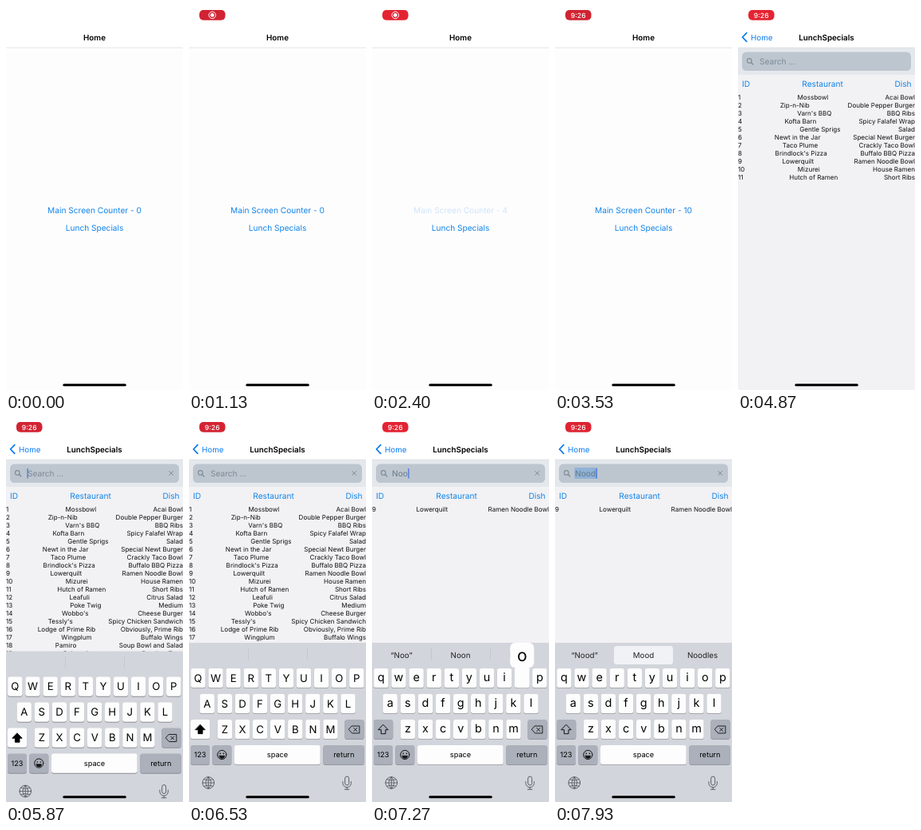
Recreate the animation shown at these times as an HTML page with a canvas. Size 222 by 480 pixels, loop 8000 ms.

```html
<!DOCTYPE html>
<html lang="en">
<head>
<meta charset="utf-8">
<title>Lunch specials app</title>
<style>
html, body { margin: 0; width: 100%; height: 100%; overflow: hidden; background: #fefdfe; }
canvas { display: block; width: 222px; height: 480px; }
</style>
</head>
<body>
<canvas id="stage"></canvas>
<script>
const W = 222, H = 480, LOOP = 8000;
const BLUE = '#1084e8', GREY = '#7d8a96';
const canvas = document.getElementById('stage');
const ctx = canvas.getContext('2d');
const dpr = window.devicePixelRatio || 1;
canvas.width = W * dpr;
canvas.height = H * dpr;

const ROWS = [
  ['Mossbowl', 'Acai Bowl'], ['Zip-n-Nib', 'Double Pepper Burger'],
  ["Varn's BBQ", 'BBQ Ribs'], ['Kofta Barn', 'Spicy Falafel Wrap'],
  ['Gentle Sprigs', 'Salad'], ['Newt in the Jar', 'Special Newt Burger'],
  ['Taco Plume', 'Crackly Taco Bowl'], ["Brindlock's Pizza", 'Buffalo BBQ Pizza'],
  ['Lowerquilt', 'Ramen Noodle Bowl'], ['Mizurei', 'House Ramen'],
  ['Hutch of Ramen', 'Short Ribs'], ['Leafuli', 'Citrus Salad'],
  ['Poke Twig', 'Medium'], ["Wobbo's", 'Cheese Burger'],
  ["Tessly's", 'Spicy Chicken Sandwich'], ['Lodge of Prime Rib', 'Obviously, Prime Rib'],
  ['Wingplum', 'Buffalo Wings'], ['Pamiro', 'Soup Bowl and Salad'],
  ["Galvero's", 'Carnitas Taco'], ['Tivra', 'Al Pastor Taco'],
  ["Nibbly Cheddar's", 'Nothing'], ['Toasted Elk', 'Ice Cream Sandwich']
].map(([name, dish], i) => ({ id: String(i + 1), name, dish }));

const TYPED = [['N', 6730], ['o', 7030], ['o', 7240], ['d', 7530]];
const HINTS = [
  ['', '', ''], ['“N”', 'No', 'Not'], ['“No”', 'Not', 'Now'],
  ['“Noo”', 'Noon', 'Nook'], ['“Nood”', 'Mood', 'Noodles']
];

const ramp = (t, from, length) => Math.min(1, Math.max(0, (t - from) / length));
const easeOut = p => 1 - (1 - p) ** 3;

function text(s, x, y, size, color, align = 'left', weight = 400) {
  ctx.font = `${weight} ${size}px Inter, sans-serif`;
  ctx.textAlign = align;
  ctx.fillStyle = color;
  ctx.fillText(s, x, y);
}

function box(x, y, w, h, r, color) {
  ctx.fillStyle = color;
  ctx.beginPath();
  ctx.roundRect(x, y, w, h, r);
  ctx.fill();
}

function line(d, color, width, fill) {
  const path = new Path2D(d);
  ctx.strokeStyle = color;
  ctx.lineWidth = width;
  ctx.lineCap = ctx.lineJoin = 'round';
  if (fill) { ctx.fillStyle = fill; ctx.fill(path); }
  ctx.stroke(path);
}

function circle(x, y, r, color, width) {
  ctx.beginPath();
  ctx.arc(x, y, r, 0, 7);
  ctx.fillStyle = ctx.strokeStyle = color;
  ctx.lineWidth = width;
  width ? ctx.stroke() : ctx.fill();
}

function layer(x, y, alpha, draw) {
  ctx.save();
  ctx.translate(x, y);
  ctx.globalAlpha *= alpha;
  draw();
  ctx.restore();
}

function homeScreen(t) {
  // one tap every 200 ms; the label dims while pressed
  const since = t - 1450, phase = since % 200;
  const count = Math.min(10, Math.max(0, Math.floor(since / 200)));
  let alpha = 1;
  if (t > 1570 && t < 3450 && phase > 120) alpha = 0.2;
  else if (t >= 1650 && t < 3550) alpha = 0.2 + 0.8 * easeOut(ramp(phase, 0, 90));
  layer(0, 0, alpha, () => text(`Main Screen Counter - ${count}`, 111, 258.7, 10.15, BLUE, 'center'));
  const lunchAlpha = t > 4020 && t < 4140 ? 0.2 : 1;
  layer(0, 0, lunchAlpha, () => text('Lunch Specials', 111, 281, 10.15, BLUE, 'center'));
}

function searchBar(t, query) {
  box(0, 52, W, 34, 0, '#e4e8ec');
  box(5, 57.5, 212, 23.5, 5.5, '#bdc6cf');
  circle(14.3, 68.4, 2.8, GREY, 1.1);
  line('M16.4 70.5 L18.8 73', GREY, 1.3);
  const selected = query.length === 4 && t > 7650;
  if (selected) box(24.5, 62, 28.5, 14, 0, '#8fb2d6');
  if (query) text(query, 25, 73, 10.15, '#66798c');
  else text('Search ...', 27, 73, 10.15, GREY);
  if (t < 5560) return;
  line('M204.7 66.5 l5 5 M209.7 66.5 l-5 5', GREY, 1);
  const idle = t - (query ? TYPED[query.length - 1][1] : 5600);
  if (idle % 1000 < 500) {
    const end = query ? 25.5 + ctx.measureText(query).width : 26.5;
    box(end, 63, 1.2, 12.5, 0.5, '#3d6fe0');
  }
}

function lunchScreen(t, query) {
  box(0, 52, W, H, 0, '#f2f1f4');
  searchBar(t, query);
  text('ID', 5, 101, 10.15, BLUE);
  text('Restaurant', 106, 101, 10.15, BLUE, 'center');
  text('Dish', 217.5, 101, 10.15, BLUE, 'right');
  const loaded = ROWS.slice(0, t < 5070 ? 11 : 22);
  const found = loaded.filter(r => (r.name + ' ' + r.dish).toLowerCase().includes(query.toLowerCase()));
  found.forEach(({ id, name, dish }, i) => {
    const y = 116.8 + 10.02 * i;
    text(id, 0, y, 8.05, '#111');
    text(dish, W, y, 8.05, '#111', 'right');
    const [idW, nameW, dishW] = [id, name, dish].map(s => ctx.measureText(s).width);
    text(name, idW + (W - idW - nameW - dishW) / 2, y, 8.05, '#111');
  });
}

function header(push) {
  box(0, 0, W, 52, 0, '#fff');
  box(0, 51.7, W, 0.8, 0, '#dcdcde');
  layer(-82 * push, 0, 1 - push, () => text('Home', 111, 42.6, 9.8, '#000', 'center', 600));
  if (!push) return;
  layer(110 * (1 - push), 0, push, () => text('LunchSpecials', 111, 42.6, 9.8, '#000', 'center', 600));
  layer(0, 0, push, () => line('M10.8 33.6 L5.6 39 L10.8 44.4', '#0a7cf0', 1.8));
  layer(80 * (1 - push), 0, push, () => text('Home', 16, 42.6, 9.8, '#0a7cf0'));
}

function recordingPill(t) {
  const pulse = Math.cos((t - 2230) / 2600 * 2 * Math.PI);
  const toTime = ramp(t, 2800, 250);
  layer(0, 0, ramp(t, 300, 300), () => {
    box(13, 5, 32.5, 12.7, 5, `rgb(${218 + 10 * pulse}, 35, 50)`);
    layer(0, 0, 1 - toTime, () => {
      circle(29.2, 11.4, 4.3, '#fff', 1);
      circle(29.2, 11.4, 2.4, '#fff');
    });
    layer(0, 0, toTime, () => text('9:26', 29.2, 14.6, 8.6, '#fff', 'center', 500));
  });
}

function key(x, y, w, color) {
  box(x, y + 0.8, w, 24.3, 3, '#8b8d93');
  box(x, y, w, 24.3, 3, color);
}

function suggestions(words) {
  const strong = words[1] === 'Mood';
  if (strong) box(74, 285, 74, 23, 3.5, '#f1f2f5');
  else [74, 148].forEach(x => box(x, 288, 0.7, 14, 0, '#bfc2c9'));
  words.forEach((word, i) => text(word, [37, 111, 185][i], 300.2, 9.75, '#222', 'center'));
}

function keyboard(t, query) {
  const upper = !query, special = '#abb0ba';
  box(0, 281, W, 199, 0, '#d2d5db');
  suggestions(HINTS[query.length]);

  const pressed = TYPED.find(([, at]) => t >= at - 30 && t < at + 70);
  let popup;
  ['qwertyuiop', 'asdfghjkl', 'zxcvbnm'].forEach((letters, row) => {
    const y = 313 + 32 * row;
    [...letters].forEach((letter, i) => {
      const mid = 11.4 + 22.1 * i + [0, 11.3, 33.5][row];
      const label = upper ? letter.toUpperCase() : letter;
      key(mid - 9.2, y, 18.4, '#fdfdfe');
      text(label, mid, y + (upper ? 16.9 : 16.2), upper ? 13.2 : 14.4, '#000', 'center');
      if (pressed && pressed[0].toLowerCase() === letter) popup = [mid, y, pressed[0]];
    });
  });

  key(2, 377, 24.3, upper ? '#fdfdfe' : special);
  line('M14.2 383.5 l6 6.2 h-3.2 v5 h-5.6 v-5 h-3.2 z', '#000', 0.9, upper ? '#000' : '');
  key(195.3, 377, 24.3, special);
  line('M204.5 385 h9.3 v9 h-9.3 l-4 -4.5 z M206.7 387.5 l4 4 M210.7 387.5 l-4 4', '#111', 0.9);

  key(2, 409, 24, special);
  text('123', 14, 424.3, 9.1, '#000', 'center');
  key(29.3, 409, 24, special);
  circle(41.3, 421, 5.6, '#111', 1);
  circle(39.2, 419.4, 0.8, '#111');
  circle(43.4, 419.4, 0.8, '#111');
  line('M38 422.2 h6.6 a3.3 3.3 0 0 1 -6.6 0 z', '#111', 0.6, '#111');
  key(57, 409, 107.7, '#fdfdfe');
  text('space', 111, 424, 9.2, '#000', 'center');
  key(168.3, 409, 51.5, special);
  text('return', 194.3, 424, 9.2, '#000', 'center');

  const ink = '#50555c';
  circle(24.3, 456, 7.3, ink, 0.9);
  line('M24.3 448.7 v14.6 M17 456 h14.6 M18.7 451.8 q5.6 2.6 11.2 0 M18.7 460.2 q5.6 -2.6 11.2 0'
    + ' M24.3 448.7 q-7 7.3 0 14.6 q7 -7.3 0 -14.6', ink, 0.8);
  line('M195.6 450.5 a2.5 2.5 0 0 1 5 0 v6 a2.5 2.5 0 0 1 -5 0 z'
    + ' M192.9 454.5 v2 a5.2 5.2 0 0 0 10.4 0 v-2 M198.1 461.8 v2.4 M195.3 464.2 h5.6', ink, 0.9);

  if (popup) {
    const [mid, y, letter] = popup;
    box(mid - 15, y - 32, 30, 31, 6, '#fdfdfe');
    box(mid - 9.2, y - 6, 18.4, 30.3, 3, '#fdfdfe');
    text(letter, mid, y - 9.5, 21, '#000', 'center');
  }
}

function draw(t) {
  const push = easeOut(ramp(t, 4160, 500));
  const query = TYPED.filter(([, at]) => t >= at).map(([c]) => c).join('');
  ctx.setTransform(dpr, 0, 0, dpr, 0, 0);
  ctx.textRendering = 'geometricPrecision';
  box(0, 0, W, H, 0, '#fefdfe');
  if (push < 1) layer(-66 * push, 0, 1, () => homeScreen(t));
  if (push > 0) layer(W * (1 - push), 0, 1, () => lunchScreen(t, query));
  header(push);
  recordingPill(t);
  const rise = easeOut(ramp(t, 5590, 450));
  if (rise > 0) layer(0, 199 * (1 - rise), 1, () => keyboard(t, query));
  box(71.3, 472.3, 79.5, 3, 1.5, '#000');
}

function tick() {
  draw(performance.now() % LOOP);
  requestAnimationFrame(tick);
}
tick();
</script>
</body>
</html>
```
